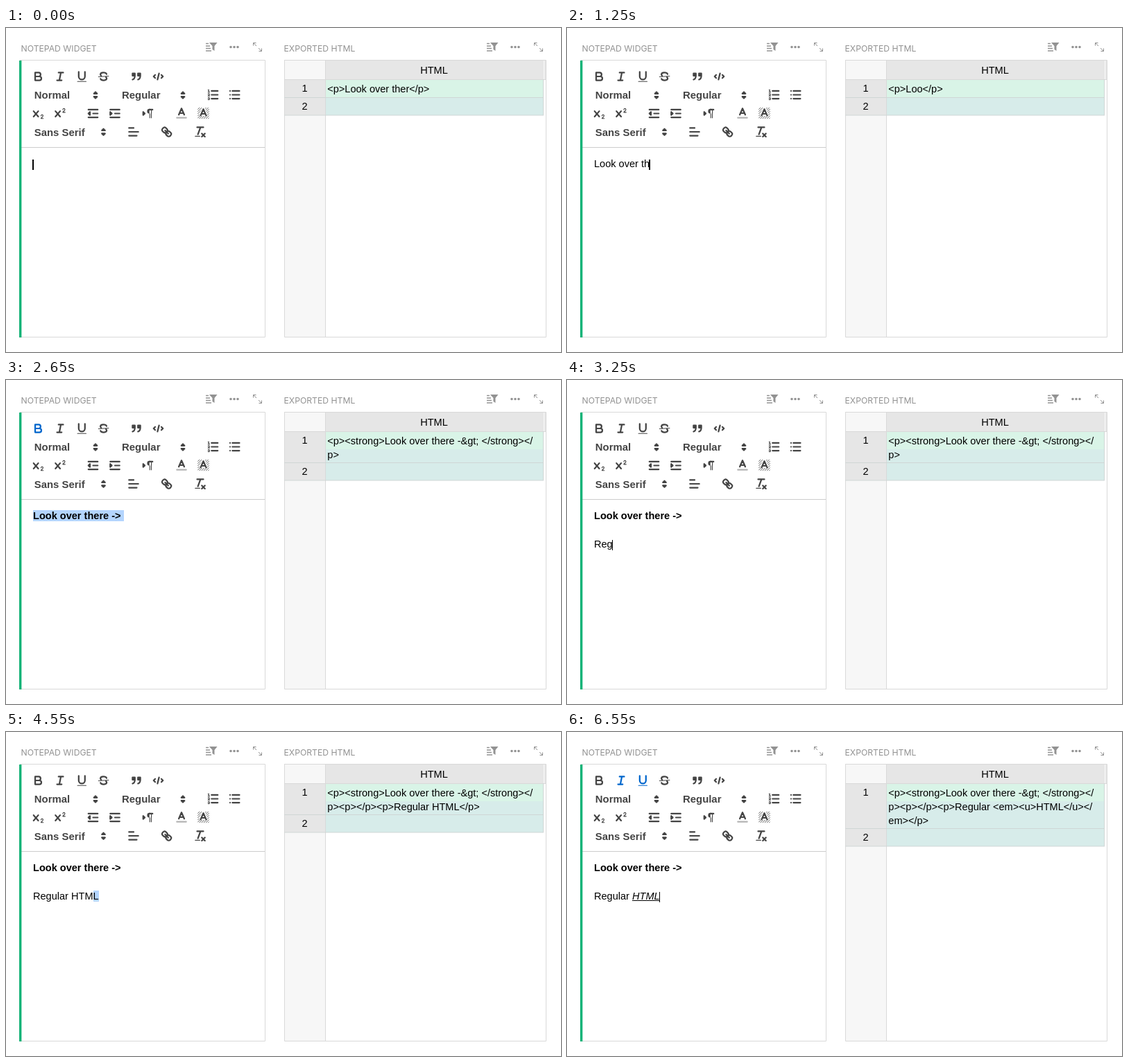
These frames come from a looping animation (800 px wide and 468 px high, 6.71 s). An HTML page:

```html
<!DOCTYPE html>
<html lang="en">
<meta charset="utf-8">
<title>Notepad widget</title>
<style>
html, body { margin: 0; width: 100%; height: 100%; overflow: hidden; background: #fff; }
body { position: relative; font: 14.56px "Liberation Sans", Arial, sans-serif; color: #000; }
svg, div { position: absolute; left: 0; top: 0; }
.icon { color: #444; fill: none; stroke: currentColor; stroke-width: 2; stroke-linecap: round; stroke-linejoin: round; }
.icon.on { color: #06c; }
.thin { stroke-width: 1; }
.hatch .thin { stroke-width: .75; }
.solid { fill: currentColor; stroke: none; }
.label { font-weight: bold; font-size: 14.9px; fill: #444; }
.title { font: 12.2px Inter, sans-serif; fill: #929292; }
.mid { text-anchor: middle; }
.tool { fill: none; stroke: #929292; }
#editor { left: 39px; top: 186px; line-height: 20.6px; white-space: pre; }
#export { left: 463.3px; top: 78px; font-size: 14.54px; line-height: 20px; white-space: pre; }
.sel { background: #b4d5fe; }
.caret { position: absolute; width: 1.2px; height: 15px; margin: 3.5px 0 0 -.7px; background: #000; }
</style>
<svg id="stage" width="800" height="468"></svg>
<div id="editor"></div>
<div id="export"></div>
<script>
const LOOP = 6710, TICK = 50;
const $ = id => document.getElementById(id);

// Toolbar icons are drawn on an 18-unit grid around their centre.
const icon = (x, y, lines, thin = '', solid = '', id = '') =>
  `<g class="icon" id="${id}" transform="translate(${x} ${y}) scale(1.12) translate(-9 -9)">
    <path d="${lines}"/><path class="thin" d="${thin}"/><path class="solid" d="${solid}"/></g>`;
const picker = (x, y, label, labelX) =>
  `<text class="label" x="${labelX}" y="${y + 5.4}">${label}</text>` +
  `<g class="icon" transform="translate(${x} ${y}) scale(1.12)">
    <path fill="#444" d="M-2 2L0 4L2 2ZM-2 -2L0 -4L2 -2Z"/></g>`;
const rect = (x, y, w, h, fill, id = '') =>
  `<rect id="${id}" x="${x}" y="${y}" width="${w}" height="${h}" fill="${fill}"/>`;

const header = (x, toolX, name) => `<text class="title" x="${x}" y="33.6">${name}</text>
  <g class="tool" transform="translate(${toolX} 0)">
    <path stroke-width="1.4" d="M0 22.5h4M0 26h6M0 29.5h7M0 33h8"/>
    <path fill="#929292" stroke="none" d="M5 21H16.5L12.5 26V33L9.5 31V26Z"/>
    <path stroke-width="3.6" stroke-linecap="round" d="M36 27.5h0M41 27.5h0M46 27.5h0"/>
    <path d="M68.5 25.5V21.5H72.5M68.5 21.5L73 26M80.5 29.5V33.5H76.5M80.5 33.5L76 29"/>
  </g>`;

const two = 'M12.5 12a1.3 1.3 0 0 1 2.7 0C15.2 13.5 12.5 14.5 12.5 15.5H15.5';
const cross = 'M3 6L9 13M9 6L3 13';
const letterA = 'M5.5 11L9 3L12.5 11M6.4 9H11.6';
let hatch = '';
for (let k = 6; k < 32; k += 2.8) {
  const a = Math.max(2, k - 16), b = Math.min(16, k - 2);
  hatch += `M${a} ${k - a}L${b} ${k - b}`;
}

$('stage').innerHTML =
  header(21.5, 288, 'NOTEPAD WIDGET') + header(400.5, 693, 'EXPORTED HTML') +
  `<path fill="none" stroke="#d9d9d9" d="M20 46.5H373.5V446.5H20"/>
   <path stroke="#ccc" d="M22 172.5H373"/>` +
  rect(19, 47, 3.4, 400, '#16b378') +
  icon(46.5, 70, 'M5 4H9.5a2.5 2.5 0 0 1 0 5H5ZM5 9h5.5a2.5 2.5 0 0 1 0 5H5Z', '', '', 'bold') +
  icon(78, 70, 'M7 4H13M5 14H11M8 14L10 4', '', '', 'italic') +
  icon(109.3, 70, 'M5 3V9a4 4 0 0 0 8 0V3', '', 'M3.5 15h11a.5.5 0 0 1 0 1h-11a.5.5 0 0 1 0-1Z', 'underline') +
  icon(140.6, 70, 'M12.9 6C12 3.3 5 3.2 5 6.5Q5 7.5 6 8M5.1 12C6 14.7 13 14.8 13 11.5Q13 10.5 12 10', 'M15.5 8.5L2.5 9.5') +
  icon(188, 70, 'M4 5h3v3H4ZM11 5h3v3H11ZM7 8c0 4-3 5-3 5M14 8c0 4-3 5-3 5', '', 'M4 5h3v3H4ZM11 5h3v3H11Z') +
  icon(219.5, 70, 'M5 7L3 9L5 11M13 7L15 9L13 11M10 5L8 13') +
  picker(129, 97, 'Normal', 40.8) + picker(255, 97, 'Regular', 167) +
  icon(298.5, 96.5, 'M7 4H15M7 9H15M7 14H15',
    'M2.5 3L3.5 2.5V5.5M2.5 5.5H4.5M4.5 10.5h-2c0-.2 1.9-1.1 1.9-2.2a1 1 0 0 0-1.9-.1M2.5 14.8a1 1 0 0 0 1.9-.1Q4.3 14 3.7 14Q4.3 14 4.4 13.3a1 1 0 0 0-1.9-.1') +
  icon(329.7, 96.5, 'M6 4H15M6 9H15M6 14H15M3 4h0M3 9h0M3 14h0') +
  icon(46.5, 123.5, cross, two) +
  icon(78, 123.5, cross, 'M12.5 4a1.3 1.3 0 0 1 2.7 0C15.2 5.5 12.5 6.5 12.5 7.5H15.5') +
  icon(125.5, 123.5, 'M3 14H15M3 4H15M9 9H15M5 7V11L3 9Z', '', 'M5 7V11L3 9Z') +
  icon(157, 123.5, 'M3 14H15M3 4H15M9 9H15M3 7V11L5 9Z', '', 'M3 7V11L5 9Z') +
  icon(204.5, 123.5, 'M3 11L5 9L3 7ZM15 4H11', '', 'M3 11L5 9L3 7ZM11 3a3 3 0 0 0 0 6h1V3ZM11 4h1V15h-1ZM13 4h1V15h-1Z') +
  icon(253, 123, letterA) +
  '<path stroke="#b4b4b4" stroke-width="2.2" stroke-linecap="round" d="M246.3 129.7h13.4"/>' +
  `<g class="hatch">${icon(284.5, 123, '', hatch)}</g>` +
  `<path transform="translate(284.5 124) scale(1.12) translate(-9 -9)" fill="#fff" stroke="#fff" stroke-width="4.5" d="${letterA}"/>` +
  icon(284.5, 124, letterA) +
  picker(140.5, 150.2, 'Sans Serif', 40.8) +
  icon(184, 150, 'M3 4H9M3 9H15M3 14H13') +
  icon(231.6, 150.2, 'M7 7L11 11M8.9 4.6a3.5 3.5 0 0 1 .4 4.7A3.5 3.5 0 0 1 4.6 8.9C3.2 7.5 2 6.4 4.2 4.2S7.5 3.2 8.9 4.6ZM13.4 9.1a3.5 3.5 0 0 0-4.7-.4a3.5 3.5 0 0 0 .4 4.7c1.4 1.4 2.5 2.5 4.7.4S14.8 10.5 13.4 9.1Z') +
  icon(280, 150.2, 'M5 3H13M6 12L9.35 3M11 11L15 15M15 11L11 15', '', 'M2.5 14h6a.5.5 0 0 1 0 1h-6a.5.5 0 0 1 0-1Z') +
  rect(401, 47, 59, 399, '#f7f7f7') + rect(461, 47, 317, 27, '#e6e6e6') +
  rect(401, 74, 59, 0, '#e6e6e6', 'rowHeads') +
  rect(461, 74, 314, 27, '#d9f4e7') + rect(461, 100, 314, 0, '#d7ecea', 'cells') +
  `<path fill="none" stroke="#d9d9d9" d="M401 46.5H778.5V446.5H401.5V46.5M460.5 47V446M401 74.5H778"/>
   <path stroke="#fafafa" d="M775.5 47V74"/>
   <path id="rowLines" fill="none" stroke="#cfd6d5"/>
   <text class="mid" x="617" y="66">HTML</text>
   <text class="mid" x="430.5" y="91.8">1</text><text class="mid" x="430.5" id="second">2</text>`;

// Keystrokes: start time, time per key, characters.
const keys = [
  [300, 125, 'Loo'], [750, 60, 'k over th'], [1350, 50, 'e'], [1450, 75, 're -> '],
  [2800, 100, '\n\n'], [3000, 100, 'Regu'], [3400, 67, 'lar '], [3900, 100, 'HTML']
];
const strong = '<p><strong>Look over there -&gt; </strong></\np>';
const exported = [
  [0, '<p>Look over ther</p>'], [350, '<p></p>'], [900, '<p>Loo</p>'],
  [2200, '<p>Look over there -&gt; </p>'], [2650, strong],
  [3950, strong + '<p></p><p>Regular </p>'], [4350, strong + '<p></p><p>Regular HTML</p>'],
  [5450, strong + '<p></p><p>Regular <em><u>HTML</u></\nem></p>']
];

const typedAt = t => keys.map(([start, gap, text]) =>
  text.slice(0, Math.max(0, Math.floor((t - start) / gap) + 1))).join('');

function editorHTML(t) {
  const caret = '<i class="caret"></i>';
  const [first, ...rest] = typedAt(t).split('\n');
  const firstSelected = t >= 2100 && t < 2700;
  let html = `<span class="${firstSelected ? 'sel' : ''}">${first}</span>`;
  if (t >= 2450) html = `<b>${html}</b>`;
  if (rest.length) html += '\n' + rest.join('\n');
  if (t >= 4500) {
    const count = t < 6500 ? Math.min(4, Math.floor((t - 4400) / 100)) : 0;
    const word = 'HTML'.slice(0, 4 - count) + `<span class="sel">${'HTML'.slice(4 - count)}</span>`;
    const style = (t >= 5150 ? 'font-style:italic;' : '') + (t >= 5300 ? 'text-decoration:underline' : '');
    html = html.slice(0, -4) + `<span style="${style}">${word}</span>`;
  }
  const hidden = firstSelected || (t >= 4500 && t < 6550);
  return hidden ? html : html + caret;
}

function draw(t) {
  $('editor').innerHTML = editorHTML(t);
  const text = exported.filter(([start]) => t >= start).pop()[1];
  $('export').textContent = text;

  const lines = text.split('\n').length;
  const split = lines === 1 ? 100.5 : 79.5 + 20 * lines, bottom = split + 25.5;
  $('rowHeads').setAttribute('height', bottom - 74);
  $('cells').setAttribute('height', bottom - 100);
  $('rowLines').setAttribute('d', `M401 ${split}H775M401 ${bottom}H775M774.5 74V${bottom}`);
  $('second').setAttribute('y', split + 17.2);

  $('bold').classList.toggle('on', t >= 2250 && t < 2900);
  $('italic').classList.toggle('on', t >= 5100);
  $('underline').classList.toggle('on', t >= 5250);
}

const begin = performance.now();
let shown = -1;
function frame() {
  const t = Math.floor((performance.now() - begin) % LOOP / TICK) * TICK;
  if (t !== shown) draw(shown = t);
  requestAnimationFrame(frame);
}
frame();
</script>
</html>
```
